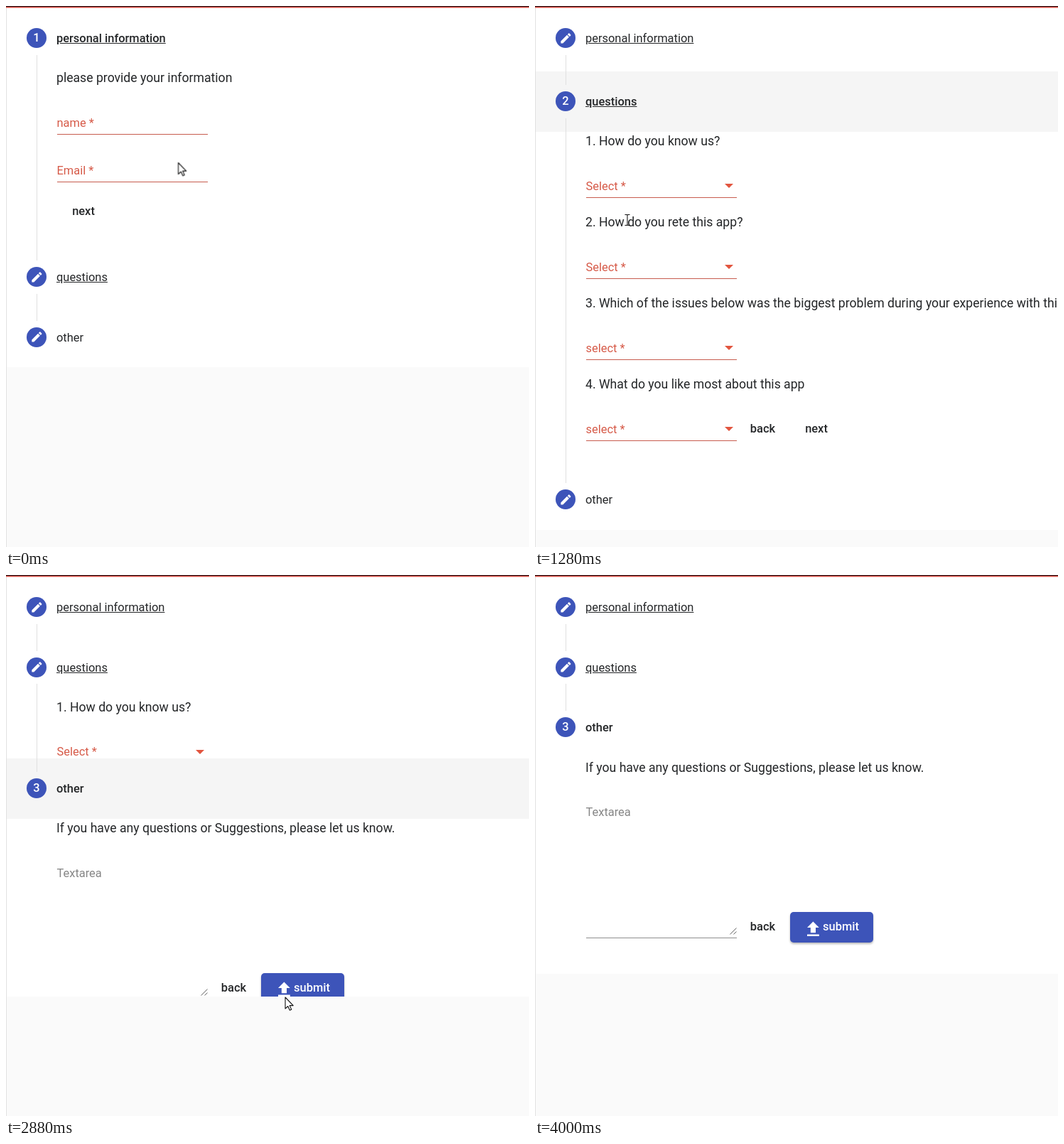
Animation, 736 px wide and 761 px high, one loop 4.56 s. Source, as an HTML page:

```html
<!DOCTYPE html>
<html lang="en">
<head>
<meta charset="utf-8">
<title>Stepper form</title>
<style>
  :root {
    --loop: 4560ms;
    --blue: #3d54b9;
    --red: #d65a48;
    --ease: cubic-bezier(.4, 0, .2, 1);
  }
  html, body { margin: 0; width: 100%; height: 100%; overflow: hidden; }
  body {
    position: relative;
    background: #fafafa;
    color: #242628;
    font: 16.45px/20px Roboto, sans-serif;
    white-space: nowrap;
  }
  body::before, body::after { content: ""; position: absolute; left: 0; top: 0; }
  body::before { z-index: 3; width: 1px; height: 100%; background: #e2e2e2; }
  body::after {
    z-index: 4; width: 100%; height: 3px;
    background: linear-gradient(#1c1113 1px, #cb4a43 1px 2px, #ee9a93 2px);
  }

  .stepper { padding-top: 3.1px; background: #fff; }

  /* Step headers: --on marks the active step, --grey its focus shade */
  .head {
    --on: 0; --grey: 0;
    position: relative; height: 84.7px;
    background: rgba(0, 0, 0, calc(.038 * var(--grey)));
    animation: var(--loop) step-end infinite;
  }
  .head.s1 { animation-name: first; }
  .head.s2 { animation-name: second; }
  .head.s3 { animation-name: third; }
  .dot {
    position: absolute; left: 29px; top: 28px; width: 28px; height: 28px;
    border-radius: 50%; background: var(--blue); color: #fff;
  }
  .dot b {
    position: absolute; inset: 0; text-align: center;
    font-weight: 500; line-height: 28px; opacity: var(--on);
  }
  .dot svg {
    position: absolute; left: 4.6px; top: 4.6px; width: 18.8px; height: 18.8px;
    fill: #fff; opacity: calc(1 - var(--on));
  }
  .label {
    position: absolute; left: 71px; top: 32.75px;
    font-weight: calc(400 + 100 * var(--on));
  }
  .s1 .label, .s2 .label { text-decoration: underline; }

  /* Collapsing step bodies */
  .body { position: relative; height: 0; animation: var(--loop) infinite; }
  .body.s1 { animation-name: body1; }
  .body.s2 { animation-name: body2; }
  .body.s3 { animation-name: body3; }
  .body:not(.s3)::before {
    content: ""; position: absolute; z-index: 1;
    left: 43px; top: -19px; bottom: -19px; width: 1px; background: #e0e0e0;
  }
  .clip { position: relative; height: 100%; overflow: hidden; }
  .clip p, .field, .btn, .q { position: absolute; margin: 0; }
  .q { left: 0; top: calc(114px * var(--i)); }
  .clip p { left: 71px; top: 3.35px; font-size: 17.64px; }
  .field {
    left: 71.5px; top: 67px; width: 212px; height: 25.4px;
    color: var(--red); border-bottom: 1px solid #c75c4e;
  }
  .q .field::after {
    content: ""; position: absolute; left: 195px; top: 6.4px;
    border: 6px solid transparent; border-top-color: #e2553f; border-bottom: 0;
  }
  .field.area { height: 185.6px; color: #858585; border-color: #8e8e8e; }
  .area svg {
    position: absolute; right: 0; bottom: 4px; width: 10px; height: 10px;
    fill: none; stroke: #666;
  }
  .btn {
    width: 75px; height: 42.5px; border-radius: 5px; overflow: hidden;
    text-align: center; font-weight: 500; line-height: 42.5px;
  }
  .btn.hover1 { left: 71.5px; top: 180.2px; animation: hover1 var(--loop) step-end infinite; }
  .btn.hover2 { left: 358.5px; top: 397.6px; animation: hover2 var(--loop) step-end infinite; }
  .btn.back { left: 283px; }
  .btn.submit {
    left: 358.5px; top: 217px; width: 117px;
    background: var(--blue); color: #fff; overflow: visible;
    text-align: left; text-indent: 46.5px;
    box-shadow: 0 2px 3px rgba(0, 0, 0, .28);
  }
  .submit svg {
    position: absolute; left: 18px; top: 9.4px; width: 28.8px; height: 28.8px; fill: #fff;
  }
  .ripple {
    position: absolute; left: var(--x); top: var(--y);
    width: calc(2 * var(--r)); height: calc(2 * var(--r));
    margin: calc(-1 * var(--r)) 0 0 calc(-1 * var(--r));
    border-radius: 50%; background: rgba(0, 0, 0, .086);
    transform: scale(0); animation: var(--loop) infinite;
  }
  .hover1 .ripple { --x: 56px; --y: 29px; --r: 63px; animation-name: ripple1; }
  .hover2 .ripple { --x: 36px; --y: 24px; --r: 45px; animation-name: ripple2; }

  .cursor {
    position: absolute; z-index: 5; left: 0; top: 0; width: 1px; height: 1px;
    overflow: visible; animation: move var(--loop) infinite;
  }
  .cursor path {
    fill: #fff; stroke: #111; stroke-width: 1.1; stroke-linejoin: round;
    animation: var(--loop) step-end infinite;
  }
  .cursor .arrow { animation-name: arrow; }
  .cursor .hand { animation-name: hand; }
  .cursor .beam { fill: none; animation-name: beam; }

  @keyframes first { 0% { --on: 1 } 24.23%, 100% { --on: 0 } }
  @keyframes second {
    0% { --on: 0; --grey: 0 }
    24.23% { --on: 1; --grey: 1 }
    60.75%, 100% { --on: 0; --grey: 0 }
  }
  @keyframes third {
    0% { --on: 0; --grey: 0 }
    60.75% { --on: 1; --grey: 1 }
    86.84%, 100% { --on: 1; --grey: 0 }
  }

  @keyframes body1 {
    0%, 24.23% { height: 251.3px; animation-timing-function: var(--ease) }
    28.86%, 100% { height: 0 }
  }
  @keyframes body2 {
    0%, 24.23% { height: 0; animation-timing-function: var(--ease) }
    28.86%, 60.75% { height: 484px; animation-timing-function: var(--ease) }
    65.37%, 100% { height: 0 }
  }
  @keyframes body3 {
    0%, 60.75% { height: 0; animation-timing-function: var(--ease) }
    65.37%, 100% { height: 303.5px }
  }

  @keyframes hover1 {
    0% { background: none }
    13.3% { background: #f5f5f5 }
    27.2%, 100% { background: none }
  }
  @keyframes hover2 {
    0% { background: none }
    49.6% { background: #f6f6f6 }
    62.7%, 100% { background: none }
  }
  @keyframes ripple1 {
    0%, 23.36% { transform: scale(0); animation-timing-function: cubic-bezier(0, 0, .2, 1) }
    28.29%, 100% { transform: scale(1) }
  }
  @keyframes ripple2 {
    0%, 59.87% { transform: scale(0); animation-timing-function: cubic-bezier(0, 0, .2, 1) }
    64.8%, 100% { transform: scale(1) }
  }

  @keyframes move {
    0%, .88% { transform: translate(242.5px, 220.5px); animation-timing-function: ease-in-out }
    10.53%, 13.16% { transform: translate(147.5px, 282px); animation-timing-function: ease-out }
    17.54%, 25.44% { transform: translate(128px, 295.5px) }
    32.46%, 34.2% { transform: translate(131px, 304px); animation-timing-function: ease-in }
    37.7% { transform: translate(176px, 415px); animation-timing-function: ease-out }
    43.86% { transform: translate(360px, 618px) }
    49.1% { transform: translate(388px, 621px); animation-timing-function: ease-out }
    52.6%, 54% { transform: translate(399px, 593.5px) }
    57.9%, 74.56% { transform: translate(393px, 594px); animation-timing-function: ease-in }
    85.1%, 100% { transform: translate(684px, 775px) }
  }
  @keyframes arrow {
    0% { opacity: 1 } 13.4% { opacity: 0 } 34.65% { opacity: 1 }
    49.8% { opacity: 0 } 61.84%, 100% { opacity: 1 }
  }
  @keyframes hand {
    0% { opacity: 0 } 13.4% { opacity: 1 } 27.19% { opacity: 0 }
    49.8% { opacity: 1 } 61.84%, 100% { opacity: 0 }
  }
  @keyframes beam { 0% { opacity: 0 } 27.19% { opacity: 1 } 34.65%, 100% { opacity: 0 } }
</style>
</head>
<body>
<svg width="0" height="0" style="position:absolute">
  <symbol id="pencil" viewBox="0 0 24 24">
    <path d="M3 17.25V21h3.75L17.81 9.94l-3.75-3.75zM20.71 7.04a1 1 0 0 0 0-1.41l-2.34-2.34a1 1 0 0 0-1.41 0l-1.83 1.83 3.75 3.75z"/>
  </symbol>
</svg>

<main class="stepper">
  <div class="head s1">
    <span class="dot"><b>1</b><svg><use href="#pencil"/></svg></span>
    <span class="label">personal information</span>
  </div>
  <div class="body s1"><div class="clip">
    <p>please provide your information</p>
    <div class="field">name *</div>
    <div class="field" style="top:134px">Email *</div>
    <div class="btn hover1">next<i class="ripple"></i></div>
  </div></div>

  <div class="head s2">
    <span class="dot"><b>2</b><svg><use href="#pencil"/></svg></span>
    <span class="label">questions</span>
  </div>
  <div class="body s2"><div class="clip">
    <div class="q" style="--i:0"><p>1. How do you know us?</p><div class="field">Select *</div></div>
    <div class="q" style="--i:1"><p>2. How do you rete this app?</p><div class="field">Select *</div></div>
    <div class="q" style="--i:2"><p>3. Which of the issues below was the biggest problem during your experience with this app?</p><div class="field">select *</div></div>
    <div class="q" style="--i:3"><p>4. What do you like most about this app</p><div class="field">select *</div></div>
    <div class="btn back" style="top:397.6px">back</div>
    <div class="btn hover2">next<i class="ripple"></i></div>
  </div></div>

  <div class="head s3">
    <span class="dot"><b>3</b><svg><use href="#pencil"/></svg></span>
    <span class="label">other</span>
  </div>
  <div class="body s3"><div class="clip">
    <p>If you have any questions or Suggestions, please let us know.</p>
    <div class="field area">Textarea<svg viewBox="0 0 10 10"><path d="M.5 9.5l9-9M5.5 9.5l4-4"/></svg></div>
    <div class="btn back" style="top:217px">back</div>
    <div class="btn submit"><svg viewBox="0 0 24 24"><path d="M9 16h6v-6h4l-7-7-7 7h4zm-4 2h14v2H5z"/></svg>submit</div>
  </div></div>
</main>

<svg class="cursor">
  <path class="arrow" d="M0 0V16L3.7 12.6 6.3 18.3 8.7 17.3 6.2 11.6H11.2Z"/>
  <path class="hand" d="M-2 2Q-2 0-.3 0T1.5 2V8Q1.7 6.6 3.2 6.8T4.8 8.4Q5 7.4 6.4 7.6T8 9.2Q8.4 8.4 9.5 8.8T10.6 10.6V15Q10.6 17.5 9 19.5V21.5H0V20Q-1.5 18-4 14.6-6 12-5.5 11-4.5 9.8-2.8 11.4L-2 12.4Z"/>
  <path class="beam" d="M-3.5-7.5H-1L0-7 1-7.5H3.5M0-7V7M-3.5 7.5H-1L0 7 1 7.5H3.5"/>
</svg>

<script>
  // Hold every pose for one tick, as a 25 fps screen recording does
  const TICK = 40;
  const parts = document.getAnimations();
  parts.forEach(part => part.pause());
  let start;

  function show(now) {
    start ??= now;
    const time = Math.floor((now - start + 1) / TICK) * TICK;
    parts.forEach(part => { part.currentTime = time; });
    requestAnimationFrame(show);
  }
  requestAnimationFrame(show);
</script>
</body>
</html>
```
